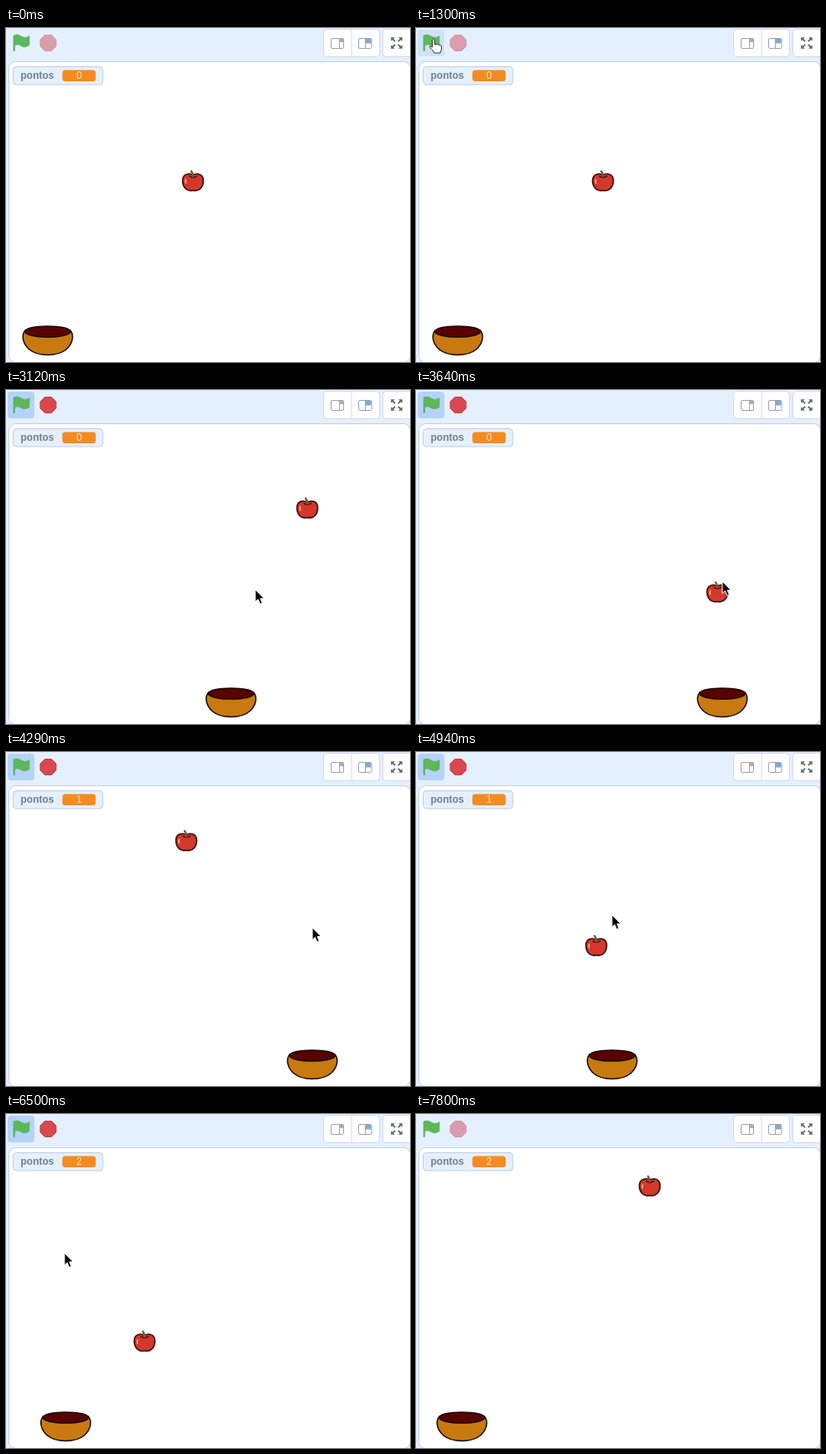
An HTML page that plays this animation: 484x401 px, repeating every 8.06 s.

```html
<!DOCTYPE html>
<html lang="pt">
<head>
<meta charset="utf-8">
<title>Jogo da maçã</title>
<style>
  html, body { margin: 0; width: 100%; height: 100%; overflow: hidden; background: #e5f0ff; }
  svg { display: block; }
  text { font-family: "Liberation Sans", Arial, sans-serif; font-size: 12px; }
</style>
</head>
<body>
<svg width="484" height="401" viewBox="0 0 484 401">
  <rect width="484" height="401" fill="#e5f0ff"/>

  <!-- controls -->
  <rect id="flagBack" x="2" y="2" width="32" height="32" rx="4"/>
  <path d="M9 9Q14 6.500 18.500 10Q23 13 28 9.500V20.500Q23 24.500 18 21.500Q14 18.500 10.500 21V27.500H9Z"
        fill="#5cb85a" stroke="#54ad55" stroke-width=".6" stroke-linejoin="round"/>
  <path id="stop" d="M46.500 8.500H54.500L60 14V22L54.500 27.500H46.500L41 22V14Z" stroke-linejoin="round"/>

  <!-- layout buttons -->
  <g fill="#fff" stroke="#cfdaea">
    <rect x="380.500" y="1.500" width="67" height="33" rx="4"/>
    <path d="M414 2V34"/>
    <rect x="451.500" y="1.500" width="40" height="33" rx="4"/>
  </g>
  <g fill="none" stroke="#98a3b3">
    <rect x="389.500" y="12.500" width="15" height="12" rx="1.500"/>
    <path d="M399.500 12.500V24.500"/>
    <rect x="422.500" y="12.500" width="15.500" height="12" rx="1.500"/>
    <path d="M430.500 12.500V24.500"/>
  </g>
  <rect x="400" y="13" width="4" height="4" fill="#b4aea8"/>
  <rect x="431" y="13" width="6.500" height="5.500" fill="#86abc4"/>
  <g id="expand" fill="#5d7060" stroke="#5d7060"></g>

  <!-- stage -->
  <rect x="3.500" y="40.500" width="481" height="361" rx="8" fill="#fff" stroke="#c2cee0"/>
  <clipPath id="stageClip"><rect x="4" y="41" width="480" height="360" rx="7"/></clipPath>
  <g clip-path="url(#stageClip)">
    <g id="bowl" stroke="#120800" stroke-width="1.500">
      <path d="M-27 363C-32 369 -30 379 -22 386C-12 394.500 12 394.500 22 386C30 379 32 369 27 363Z" fill="#c87a10"/>
      <ellipse cy="364.500" rx="27.300" ry="6.600" fill="#590204"/>
    </g>
    <g id="apple" stroke-linecap="round">
      <path d="M0 -7.500C4 -10 12.800 -9.500 12.400 0C12 8 7 11.300 3 11.300Q0 10.900 -3 11.300C-7 11.300 -12 8 -12.400 0C-12.800 -9.500 -4 -10 0 -7.500Z"
            fill="#d4382c" stroke="#42180f" stroke-width="1.800"/>
      <path d="M-4 -6Q0 -3.500 4.500 -6" fill="none" stroke="#5c1414" stroke-width="1.800"/>
      <path d="M0 -6Q0 -10 -2 -12" fill="none" stroke="#6a6250" stroke-width="2.500"/>
      <path d="M-8.500 -2Q-9.300 0 -8.500 2" fill="none" stroke="#f4b184" stroke-width="1.700"/>
    </g>
  </g>

  <!-- score -->
  <rect x="8.500" y="46.500" width="107.500" height="21.500" rx="4" fill="#e5f0ff" stroke="#c0cce0"/>
  <text x="17.500" y="61" font-weight="bold" fill="#728087">pontos</text>
  <rect x="67.500" y="50.500" width="40" height="13.500" rx="3.500" fill="#f48b22"/>
  <text id="score" x="87.700" y="61.300" text-anchor="middle" fill="#fde3c8">0</text>

  <g id="cursor" stroke-linejoin="round">
    <path id="arrow" d="M0 0V14.500L3.300 11.500L5.600 17L8.300 16L6 10.500H10.500Z" fill="#0c0606" stroke="#fff"/>
    <path id="hand" d="M-1.500 1Q0 -1.500 1.500 1V7Q3 5.500 4.500 7Q6 6 7 7.500Q9 7 9.500 9V12Q9 14.500 8 17H1Q-1 13 -4.500 10.500Q-5 8 -1.500 10Z"
          fill="#fff" stroke="#333"/>
  </g>
</svg>
<script>
const LOOP = 8060, STEP = 130;
const START = 1478, STOP = 6890;
const APPEAR = 650, LEAVE = 7670;
const TOP = 86, FALL = 25.2 / STEP, DROP_TIME = 1352;
const BOWL_LAG = 58;

const dropXs = [310, 361, 216, 166, 280];

// Resting points of the pointer, eased in between.
const stops = [
  { t: START, x: 21, y: 13 },
  { t: 2673, x: 125, y: 252 },
  { t: 3361, x: 367, y: 235 },
  { t: 4290, x: 367, y: 211 },
  { t: 4860, x: 235, y: 196 },
  { t: 5500, x: 231, y: 190 },
  { t: 6500, x: 70, y: 167 },
  { t: 6850, x: 55, y: 15 }
];

const $ = id => document.getElementById(id);
const place = (id, x, y) => $(id).setAttribute("transform", `translate(${x} ${y})`);
const show = (id, on) => $(id).setAttribute("visibility", on ? "visible" : "hidden");
const clamp = (v, lo, hi) => Math.min(hi, Math.max(lo, v));
const mix = (a, b, k) => a + (b - a) * k;
const ease = k => k * k * (3 - 2 * k);

function pointer(t) {
  const next = stops.findIndex(s => s.t > t);
  if (next < 0) return stops.at(-1);
  const b = stops[next], a = stops[Math.max(0, next - 1)];
  const k = a === b ? 0 : ease((t - a.t) / (b.t - a.t));
  return { x: mix(a.x, b.x, k), y: mix(a.y, b.y, k) };
}

function draw(t) {
  const running = t >= START && t < STOP;
  const played = Math.min(t, STOP) - START;
  const drop = Math.floor(played / DROP_TIME);
  const { x, y } = pointer(t);
  const visible = t >= APPEAR && t < LEAVE;
  const pointing = visible && y < 34;
  const hovering = pointing && x < 35;

  if (played < 0) place("apple", 224, 184);
  else place("apple", dropXs[drop], TOP + played % DROP_TIME * FALL);
  place("bowl", played < 0 ? 50 : pointer(t - BOWL_LAG).x, 0);
  place("cursor", x, y);
  show("arrow", visible && !pointing);
  show("hand", pointing);

  $("flagBack").setAttribute("fill", running ? "#b5d3f8" : hovering ? "#cfe2fa" : "#e5f0ff");
  $("stop").setAttribute("fill", running ? "#d9474f" : "#d99dab");
  $("stop").setAttribute("stroke", running ? "#c5404a" : "#d296a5");
  // The first apple is missed, the next two are caught.
  $("score").textContent = clamp(drop - 1, 0, 2);
}

$("expand").innerHTML = [0, 90, 180, 270].map(a =>
  `<g transform="translate(468 18) rotate(${a})">
    <path d="M1.800 -1.800L5 -5" stroke-width="1.800"/>
    <path d="M2.800 -6.500H6.500V-2.800Z" stroke-width=".6"/>
  </g>`).join("");

const began = performance.now();
function tick() {
  const t = (performance.now() - began) % LOOP;
  draw(Math.floor(t / STEP) * STEP);
  requestAnimationFrame(tick);
}
tick();
</script>
</body>
</html>
```
